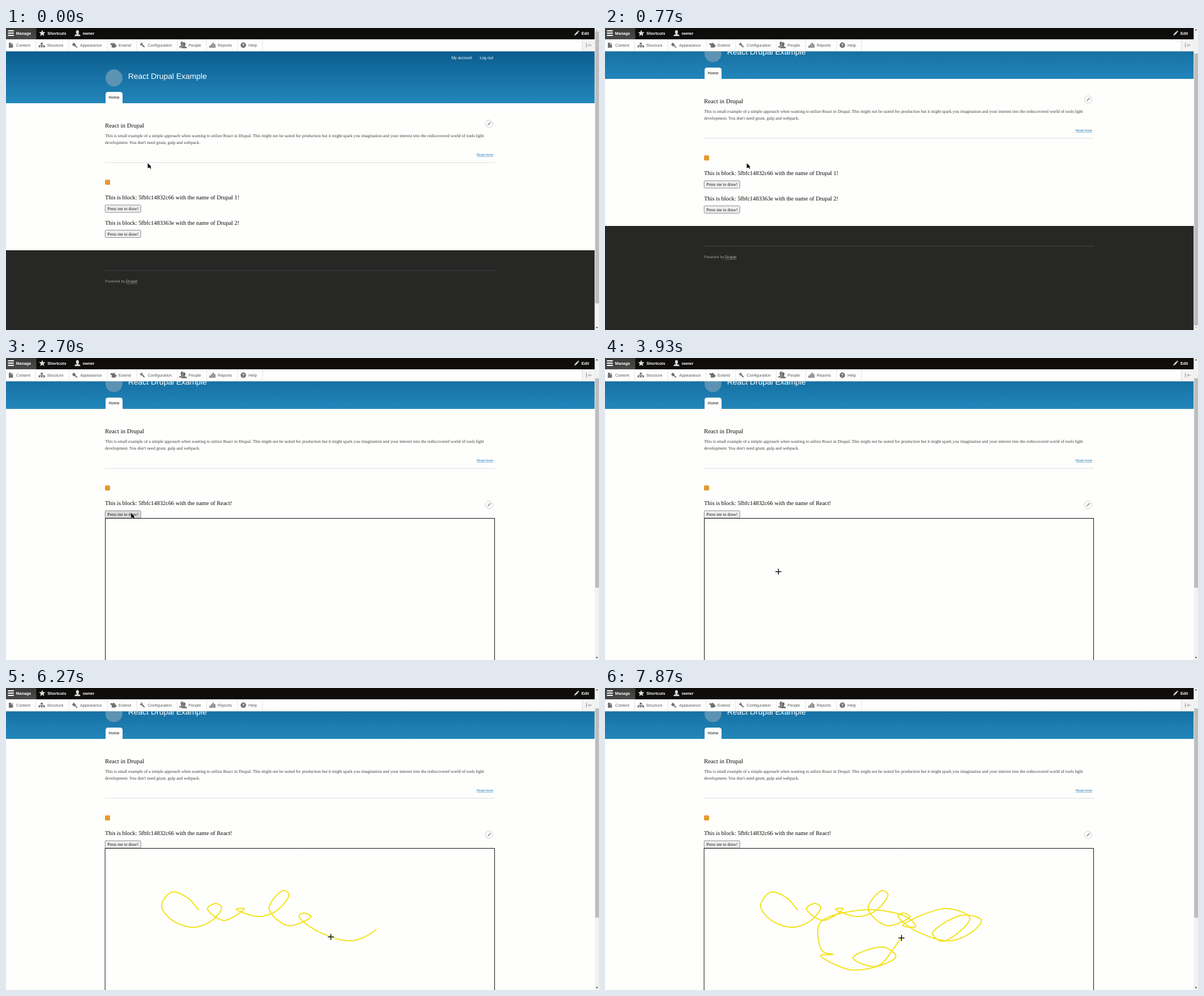
An HTML page with a canvas for the animation above (8000 ms loop, 1048x534 px).

```html
<!DOCTYPE html>
<html lang="en">
<head>
<meta charset="utf-8">
<title>React in Drupal</title>
<style>
html, body { margin: 0; width: 100%; height: 100%; overflow: hidden; background: #fefefd; }
canvas { display: block; width: 1048px; height: 534px; }
</style>
</head>
<body>
<canvas id="stage"></canvas>
<script>
const W = 1048, H = 534, LOOP = 8000, STEP = 100 / 3;
const PAGE = 1040.5, LEFT = 175, RIGHT = 864, SCROLL = 43, UI = 7.12;
const PAPER = '#fefefd', GREY = '#6f6f6f', PALE = '#ddd';
const sans = size => `${size}px "Liberation Sans", Arial, sans-serif`;
const bold = size => 'bold ' + sans(size);
const serif = size => `${size}px "Liberation Serif", Times, serif`;

const canvas = document.getElementById('stage');
const dpr = window.devicePixelRatio || 1;
canvas.width = W * dpr;
canvas.height = H * dpr;
const g = canvas.getContext('2d');

// ---- drawing helpers ----
function rect(x, y, w, h, color) {
  g.fillStyle = color;
  g.fillRect(x, y, w, h);
}
function round(x, y, w, h, r, color) {
  g.beginPath();
  g.roundRect(x, y, w, h, r);
  g.fillStyle = color;
  g.fill();
}
function stroke(color, width) {
  g.strokeStyle = color;
  g.lineWidth = width;
  g.stroke();
}
function oval(x, y, rx, ry, color) {
  g.beginPath();
  g.ellipse(x, y, rx, ry, 0, 0, Math.PI * 2);
  g.fillStyle = color;
  g.fill();
}
const circle = (x, y, r, color) => oval(x, y, r, r, color);
function triangle(x, y, w, h, color) {
  g.beginPath();
  g.moveTo(x - w / 2, y + h / 2);
  g.lineTo(x, y - h / 2);
  g.lineTo(x + w / 2, y + h / 2);
  g.fillStyle = color;
  g.fill();
}
function text(str, x, y, font, color, align = 'left') {
  g.font = font;
  g.textAlign = align;
  g.fillStyle = color;
  g.fillText(str, x, y);
}
function shade(top, bottom, from, to) {
  const fill = g.createLinearGradient(0, top, 0, bottom);
  fill.addColorStop(0, from);
  fill.addColorStop(1, to);
  return fill;
}
function at(x, y, turn, draw) {
  g.save();
  g.translate(x, y);
  g.rotate(turn);
  draw();
  g.restore();
}

// ---- motion ----
const ramp = (t, a, b) => Math.min(1, Math.max(0, (t - a) / (b - a)));

// pointer stops: start time, arrival time, place
const stops = [
  [1833, 1933, 244.5, 245], [2033, 2133, 221, 274],
  [3067, 3533, 295, 373], [3900, 4033, 340, 392]
];
function glide(t) {
  let x = 250.5, y = 239;
  for (const [a, b, tx, ty] of stops) {
    const k = ramp(t, a, b);
    x += (tx - x) * k;
    y += (ty - y) * k;
  }
  return { x, y };
}

// key points of the doodle, one string per burst of drawing
const doodle = [
  '340,392 321,371 293,361 275,385 293,410 331,423 364,411 381,388 371,381 356,390 385,411 421,390',
  '407,391 445,404 478,394 500,365 490,358 465,390 498,420 539,404',
  '526,398 518,403 545,427 610,447 654,427 665,410 630,402 579,434 597,448 645,407 602,390 526,420 549,422 535,406 466,392',
  '384,411 376,430 385,466 403,471 381,473 433,498 488,490 514,475 492,458 438,477 480,492 524,442'
].join(' ').split(' ').map(p => p.split(',').map(Number));

// centripetal Catmull-Rom curve, with the length reached at each sample
const SUB = 16;
function smooth(p) {
  const gap = (a, b) => Math.sqrt(Math.hypot(a[0] - b[0], a[1] - b[1]));
  const mirror = (a, b) => [2 * a[0] - b[0], 2 * a[1] - b[1]];
  const out = [{ x: p[0][0], y: p[0][1], len: 0 }];
  for (let i = 0; i < p.length - 1; i++) {
    const b = p[i], c = p[i + 1];
    const a = p[i - 1] || mirror(b, c), d = p[i + 2] || mirror(c, b);
    const ab = gap(a, b), bc = gap(b, c), cd = gap(c, d);
    for (let s = 1; s <= SUB; s++) {
      const u = s / SUB, u2 = u * u, u3 = u2 * u;
      const [x, y] = [0, 1].map(k => {
        const v = c[k] - b[k];
        const m1 = v + bc * ((b[k] - a[k]) / ab - (c[k] - a[k]) / (ab + bc));
        const m2 = v + bc * ((d[k] - c[k]) / cd - (d[k] - b[k]) / (bc + cd));
        return (2 * u3 - 3 * u2 + 1) * b[k] + (u3 - 2 * u2 + u) * m1 +
               (3 * u2 - 2 * u3) * c[k] + (u3 - u2) * m2;
      });
      const last = out[out.length - 1];
      out.push({ x, y, len: last.len + Math.hypot(x - last.x, y - last.y) });
    }
  }
  return out;
}
const curve = smooth(doodle);

// time at which the ink reaches a key point
const pace = [[4367, 0], [4767, 7], [5200, 11], [5867, 19], [6100, 19], [6267, 24], [6933, 34], [7660, 46]];
function inkLength(t) {
  let len = 0;
  for (let i = 1; i < pace.length; i++) {
    const [[a, from], [b, to]] = [pace[i - 1], pace[i]];
    len += (curve[to * SUB].len - curve[from * SUB].len) * ramp(t, a, b);
  }
  return len;
}
function along(len) {
  const i = Math.max(1, curve.findIndex(p => p.len >= len - 0.001));
  const [a, b] = [curve[i - 1], curve[i]];
  const k = ramp(len, a.len, b.len);
  return { i, x: a.x + (b.x - a.x) * k, y: a.y + (b.y - a.y) * k };
}
// in the fast last bursts the pointer trails the ink
const hand = t => along(inkLength(t > 6100 ? Math.max(6100, t - 80) : t));

// ---- icons, each around its own centre ----
function pencil(x, y, size, color) {
  at(x, y, Math.PI / 4, () => {
    const w = size * 0.24;
    rect(-w / 2, -size / 2, w, size * 0.14, color);
    rect(-w / 2, -size * 0.3, w, size * 0.56, color);
    at(0, size * 0.41, Math.PI, () => triangle(0, 0, w, size * 0.24, color));
  });
}
function star(x, y, r) {
  g.beginPath();
  for (let i = 0; i < 10; i++) {
    const a = i * Math.PI / 5 - Math.PI / 2, q = i % 2 ? r * 0.45 : r;
    g.lineTo(x + q * Math.cos(a), y + q * Math.sin(a));
  }
  g.fillStyle = PALE;
  g.fill();
}
function person(x, y, color) {
  oval(x, y - 2, 2.6, 3.3, color);
  rect(x - 1.4, y, 2.8, 3, color);
  round(x - 5.2, y + 2.2, 10.4, 3, [3, 3, 0, 0], color);
}
const trayItems = {
  Content() {
    rect(-3.6, -4.4, 4, 8.8, GREY);
    rect(-3.6, -1.2, 7.2, 5.6, GREY);
    triangle(2.2, -3.2, 2.4, 2.4, GREY);
  },
  Structure() {
    rect(-1.8, -4.4, 3.6, 3.2, GREY);
    rect(-4.6, -0.4, 9.2, 0.9, GREY);
    for (const x of [-5.6, -1.4, 2.8]) rect(x, 0.8, 3, 3, GREY);
  },
  Appearance() {
    at(0, 0, Math.PI / 4, () => {
      rect(-4.4, -2, 5, 4.6, GREY);
      rect(0.5, -0.8, 5.4, 1.8, GREY);
    });
  },
  Extend() {
    rect(-2.8, -2.2, 6.8, 6.4, GREY);
    rect(-5, -3.4, 4, 2.8, GREY);
    circle(0.8, -2.8, 1.5, GREY);
    circle(4.4, 1, 1.5, GREY);
  },
  Configuration() {
    at(0, 0, Math.PI / 4, () => {
      round(-2, -1, 7, 2.1, 1, GREY);
      circle(-3.2, 0, 2.4, GREY);
      rect(-6, -0.8, 2.6, 1.6, '#fff');
    });
  },
  People() {
    person(-2, -1, GREY);
    person(1, 0, '#fff');
    person(1.4, 0.2, GREY);
  },
  Reports() {
    for (let i = 0; i < 4; i++) {
      const h = 9 - Math.abs(i - 2) * 2.5;
      rect(i * 2.8 - 5.4, 4.6 - h, 2, h, GREY);
    }
  },
  Help() {
    circle(0, 0, 4.8, GREY);
    text('?', 0, 2.8, bold(7.6), '#fff', 'center');
  }
};

// ---- parts of the page ----
function toolbar() {
  rect(0, 0, PAGE, 20, '#0e0d0c');
  rect(0, 0, 53.5, 20, shade(0, 20, '#3a3a39', '#4b4a49'));
  for (let i = 0; i < 3; i++) round(3.2, 4 + i * 4, 10.8, 2.1, 0.8, '#fff');
  star(64, 9.4, 5.9);
  person(126.3, 9, PALE);
  pencil(1008.3, 9.3, 11, PALE);
  const label = (str, x) => text(str, x, 11.6, bold(UI), '#fff');
  label('Manage', 17.8);
  label('Shortcuts', 73.2);
  label('owner', 135.4);
  label('Edit', 1017);

  rect(0, 20, PAGE, 21, '#fefefe');
  rect(0, 41, PAGE, 0.6, '#8fa5b2');
  let edge = -2.1;
  for (const [name, icon] of Object.entries(trayItems)) {
    at(edge + 10.8, 30.4, 0, icon);
    text(name, edge + 20.1, 32.9, sans(UI), '#565656');
    edge += 20.1 + g.measureText(name).width + 9.5;
    rect(edge, 20, 0.7, 21, '#d8d8d8');
  }
  rect(1018.5, 20, 22, 21, '#f3f3f3');
  rect(1018.3, 20, 0.7, 21, '#d0d0d0');
  rect(1025, 26.5, 1.3, 7.6, '#a0a0a0');
  rect(1030, 29.4, 5, 2, '#bcbcbc');
  at(1029.6, 30.4, -Math.PI / 2, () => triangle(0, 0, 6, 3.2, '#bcbcbc'));
}

function scrollbar(top, height, atStart, atEnd) {
  const tone = off => off ? '#b5b5b5' : '#444';
  rect(PAGE, 0, W - PAGE, H, '#f2f2f1');
  rect(1041.3, top, 6.7, height, '#bdbdbc');
  triangle(1044.4, 3, 4, 2.4, tone(atStart));
  at(1044.4, 530, Math.PI, () => triangle(0, 0, 4, 2.4, tone(atEnd)));
}

function editMark(y) {
  circle(853.8, y, 6.7, '#fefefe');
  stroke('#c4c4c4', 0.8);
  pencil(853.8, y, 8.4, '#9a9a9a');
}

function header() {
  rect(0, 41, PAGE, 92, shade(41, 133, '#0b5d8e', '#2386bb'));
  text('My account', 787.2, 54.8, sans(UI), '#fff');
  text('Log out', 837.2, 54.8, sans(UI), '#fff');
  circle(190.8, 88.3, 15, '#5c93b3');
  text('React Drupal Example', 215.8, 90.2, sans(13.92), '#fff');
  round(176, 113, 30, 20, [4.4, 4.4, 0, 0], PAPER);
  text('Home', 191, 125.3, sans(UI), '#111', 'center');
}

function article() {
  const body = [
    'This is small example of a simple approach when wanting to utilize React in Drupal. This might not be suited for production but it might spark you imagination and your interest into the rediscovered world of tools light',
    "development. You don't need grunt, gulp and webpack."
  ];
  text('React in Drupal', LEFT, 175.9, serif(10.92), '#111');
  body.forEach((s, i) => text(s, LEFT, 193.2 + 12 * i, serif(7.675), '#3b3b3b'));
  text('Read more', 861, 226.3, sans(5.9), '#1a75b0', 'right');
  rect(832, 227.3, 29, 0.6, '#4c94c0');
  rect(LEFT, 237.6, RIGHT - LEFT, 0.8, '#cfd2d2');
  round(175, 268.2, 9, 9, 1.6, '#e39a30');
}

function block(id, name, y, fill) {
  text(`This is block: ${id} with the name of ${name}!`, LEFT, y, serif(10.4), '#080808');
  round(175.2, y + 9.6, 63, 13.1, 1.7, fill);
  stroke('#747474', 0.8);
  text('Press me to draw!', 206.7, y + 18.7, serif(7.67), '#111', 'center');
}

function footer() {
  rect(0, 393, PAGE, H, '#272726');
  rect(LEFT, 428.6, RIGHT - LEFT, 0.7, '#555');
  g.letterSpacing = '0.11px';
  text('Powered by ', LEFT, 450.3, sans(6.55), '#a3a3a3');
  text('Drupal', 212.1, 450.3, sans(6.55), '#c6c6c6');
  g.letterSpacing = '0px';
  rect(212, 451.7, 20.3, 0.6, '#9a9a9a');
}

function drawingArea(t) {
  g.strokeStyle = '#111';
  g.lineWidth = 1;
  g.strokeRect(LEFT + 0.5, 283.5, RIGHT - LEFT - 1, H);
  const len = inkLength(t);
  if (len <= 0) return;
  const tip = along(len);
  g.beginPath();
  for (const p of curve.slice(0, tip.i)) g.lineTo(p.x, p.y);
  g.lineTo(tip.x, tip.y);
  g.lineJoin = g.lineCap = 'round';
  stroke('#f3e31a', 2);
}

function arrow(x, y) {
  at(x, y, 0, () => {
    g.beginPath();
    g.moveTo(0, 0);
    g.lineTo(0, 8.8);
    g.lineTo(6.2, 6.3);
    g.closePath();
    g.lineJoin = 'miter';
    stroke('rgba(255,255,255,0.8)', 1);
    g.fillStyle = '#0a0a0a';
    g.fill();
    at(2.2, 5, -0.42, () => rect(0, 0, 1.7, 5.4, '#0a0a0a'));
  });
}
function cross(x, y) {
  const plus = (r, w, color) => {
    rect(x - r, y - w / 2, 2 * r, w, color);
    rect(x - w / 2, y - r, w, 2 * r, color);
  };
  plus(5.8, 2.6, 'rgba(255,255,255,0.7)');
  plus(5.3, 1.5, '#111');
}

function render(time) {
  const t = Math.floor((time + 4) / STEP) * STEP + 0.5;
  const scrolled = ramp(t, 667, 766);
  const opened = t > 2700;
  const mouse = t > 4367 ? hand(t) : glide(t);
  const pressed = t > 2566 && !opened;
  const hover = t > 2300 && mouse.y < 283 && !pressed;
  const fill = '#eeeeee';

  g.setTransform(dpr, 0, 0, dpr, 0, 0);
  g.textRendering = 'geometricPrecision';
  rect(0, 0, W, H, PAPER);

  g.save();
  g.translate(0, -SCROLL * scrolled);
  header();
  article();
  block('5fbfc14832c66', opened ? 'React' : 'Drupal 1', 303.4, hover ? '#dcdcdc' : fill);
  if (!opened) {
    block('5fbfc1483363e', 'Drupal 2', 347.8, fill);
    footer();
  }
  editMark(t < 1900 ? 169.5 : 302.6);
  g.restore();

  if (opened) drawingArea(t);
  toolbar();
  if (opened) scrollbar(36, 370, false, false);
  else scrollbar(6 + 39 * scrolled, 481, scrolled === 0, scrolled === 1);
  if (opened && mouse.y > 283) cross(mouse.x, mouse.y);
  else arrow(mouse.x, mouse.y);
}

function tick(now) {
  render(now % LOOP);
  requestAnimationFrame(tick);
}
render(0);
requestAnimationFrame(tick);
</script>
</body>
</html>
```
